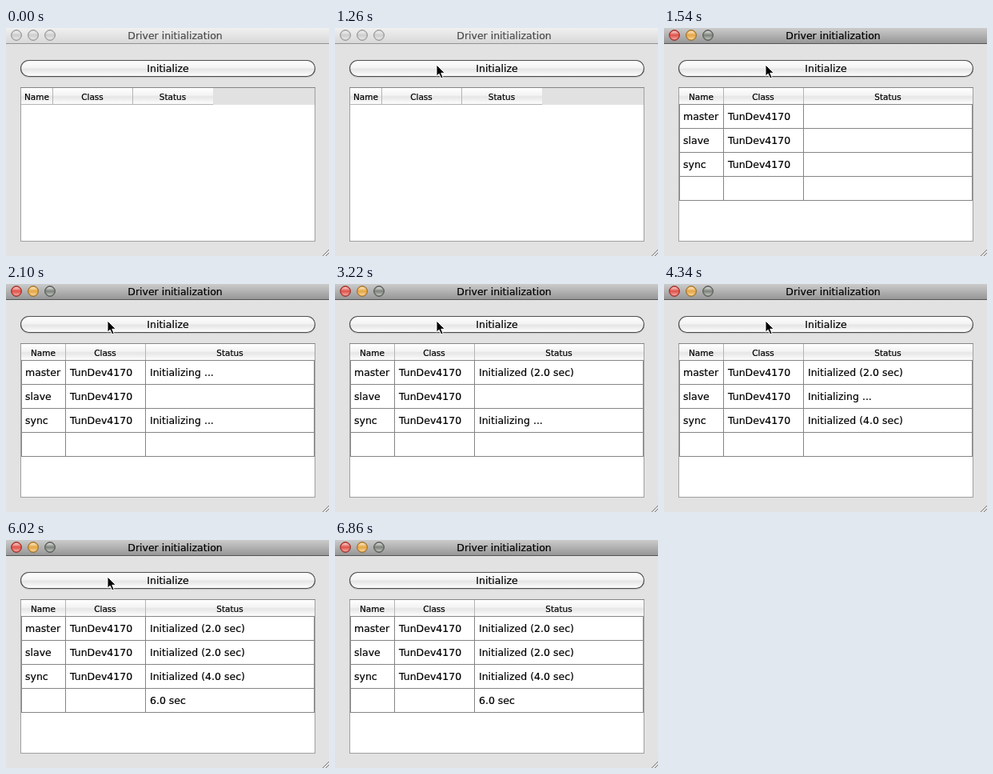
Recreate the animation shown at these times as an HTML page. Size 404 px wide and 285 px high, loop 7700 ms.

```html
<!DOCTYPE html>
<html lang="en">
<head>
<meta charset="utf-8">
<title>Driver initialization</title>
<style>
html, body { margin: 0; width: 100%; height: 100%; overflow: hidden; background: #e2e2e2; }
svg { display: block; width: 404px; height: 285px; }
text { font: 12.5px "DejaVu Sans", Verdana, sans-serif; stroke: #000; stroke-width: .2px; }
.head text { font-size: 10.5px; }
.mid { text-anchor: middle; }
.line { fill: none; stroke: #858585; shape-rendering: crispEdges; }
.sep { fill: none; stroke: #b4b4b4; shape-rendering: crispEdges; }
</style>
</head>
<body>
<svg viewBox="0 0 404 285" xmlns="http://www.w3.org/2000/svg">
  <defs>
    <linearGradient id="barOff" x2="0" y2="1"><stop stop-color="#f0f0f0"/><stop offset="1" stop-color="#d8d8d8"/></linearGradient>
    <linearGradient id="barOn" x2="0" y2="1"><stop stop-color="#cbcbcb"/><stop offset="1" stop-color="#979797"/></linearGradient>
    <linearGradient id="gloss" x2="0" y2="1">
      <stop stop-color="#fff"/><stop offset=".45" stop-color="#f3f3f3"/>
      <stop offset=".55" stop-color="#e6e6e6"/><stop offset="1" stop-color="#fdfdfd"/>
    </linearGradient>
    <linearGradient id="shine" x2="0" y2="1">
      <stop stop-color="#fff" stop-opacity=".75"/><stop offset=".5" stop-color="#fff" stop-opacity="0"/>
      <stop offset="1" stop-color="#fff" stop-opacity=".5"/>
    </linearGradient>
  </defs>
  <rect width="404" height="285" fill="#e2e2e2"/>
  <g id="bar"></g>

  <rect x="18.5" y="41.5" width="368" height="20" rx="10" fill="none" stroke="#bdbdbd"/>
  <rect x="18.5" y="40.5" width="368" height="20" rx="10" fill="url(#gloss)" stroke="#4f4f4f" stroke-width="1.2"/>
  <text class="mid" x="202.5" y="55">Initialize</text>

  <rect x="18.5" y="74.5" width="368" height="192" fill="#fff" stroke="#a0a0a0" shape-rendering="crispEdges"/>
  <path class="line" d="M18 74.5H387"/>
  <g id="before"></g>
  <g id="after"></g>

  <path d="M396 285l8-8M400 285l4-4" stroke="#777" fill="none"/>
  <path id="cursor" d="M0 0V14.2L3.2 11.3L5.7 17L8.2 15.9L5.8 10.3H10.4Z" fill="#000" stroke="#fff" stroke-width="1"/>
</svg>
<script>
const LOOP = 7700, STEP = 140;
const FOCUS = 1400, FILL = 1540, START = 2100, SECOND = 560;
const $ = id => document.getElementById(id);

const label = (x, y, s, attrs = '') => `<text x="${x}" y="${y}" ${attrs}>${s}</text>`;

// Column headers between the given edges
function header(edges) {
  const names = ['Name', 'Class', 'Status'];
  const end = edges[3];
  let out = `<rect x="19" y="75" width="${end - 19}" height="20" fill="url(#gloss)"/>` +
    `<path class="sep" d="M19 95.5H${end}"/>`;
  names.forEach((name, i) => {
    out += label((edges[i] + edges[i + 1]) / 2, 90, name, 'class="mid"');
    if (i < 2) out += `<path class="sep" d="M${edges[i + 1] + .5} 75V95"/>`;
  });
  return `<g class="head">${out}</g>`;
}

function titleBar(on) {
  const lamps = on ? ['#df5148', '#e6a640', '#7d837b'] : ['#cdcdcd', '#cdcdcd', '#cdcdcd'];
  const rim = on ? ['#8e302b', '#94682a', '#50554f'] : ['#8c8c8c', '#8c8c8c', '#8c8c8c'];
  const ink = on ? '#000' : '#4c4c4c';
  return `<rect width="404" height="19" fill="url(#${on ? 'barOn' : 'barOff'})"/>` +
    `<rect y="19" width="404" height="1" fill="${on ? '#555' : '#939393'}"/>` +
    [13, 34, 55].map((x, i) =>
      `<circle cx="${x}" cy="9" r="6.4" fill="${lamps[i]}" stroke="${rim[i]}"/>` +
      `<circle cx="${x}" cy="9" r="5.2" fill="url(#shine)"/>`).join('') +
    label(211.5, 14, 'Driver initialization', `class="mid" fill="${ink}" style="stroke:${ink}"`);
}

$('before').innerHTML = '<rect x="259" y="75" width="127" height="21" fill="#e1e1e1"/>' +
  header([19, 58, 158, 259]);

const rows = ['master', 'slave', 'sync', ''];
$('after').innerHTML = header([19, 74, 174, 386]) +
  '<path class="line" d="M19.5 96V216M74.5 96V216M174.5 96V216M385.5 96V216' +
  [95.5, 125.5, 155.5, 185.5, 215.5].map(y => `M19 ${y}H386`).join('') + '"/>' +
  rows.map((name, i) => {
    const y = 115 + i * 30;
    return label(24, y, name) + label(80, y, name && 'TunDev4170') + label(180, y, '', 'class="status"');
  }).join('');
const cells = [...document.querySelectorAll('.status')];

// Start and duration of each row's job, in seconds of the run
const jobs = [[0, 2], [4, 2], [0, 4]];

function statusText(i, sec) {
  if (i === 3) return sec >= 6 ? '6.0 sec' : '';
  const [from, len] = jobs[i];
  if (sec < from) return '';
  return sec < from + len ? 'Initializing ...' : `Initialized (${len.toFixed(1)} sec)`;
}

// Pointer path: time, x, y
const path = [[560, -12, 190], [840, 40, 130], [1120, 115, 60], [1260, 127, 46],
  [6020, 127, 46], [6300, 98, 95], [6580, 42, 190], [6860, -14, 256]];

function pointerAt(t) {
  const n = path.findIndex(p => p[0] > t);
  if (n < 1) return [-20, 0];
  const a = path[n - 1], b = path[n], k = (t - a[0]) / (b[0] - a[0]);
  return [a[1] + (b[1] - a[1]) * k, a[2] + (b[2] - a[2]) * k];
}

let shownBar = null;
function draw(t) {
  const on = t >= FOCUS, full = t >= FILL;
  if (on !== shownBar) {
    $('bar').innerHTML = titleBar(on);
    shownBar = on;
  }
  $('before').style.display = full ? 'none' : '';
  $('after').style.display = full ? '' : 'none';
  const sec = (t - START) / SECOND;
  cells.forEach((cell, i) => { cell.textContent = statusText(i, sec); });
  $('cursor').setAttribute('transform', `translate(${pointerAt(t)})`);
}

const begin = performance.now();
function tick() {
  const t = (performance.now() - begin) % LOOP;
  draw(Math.floor(t / STEP) * STEP);
  requestAnimationFrame(tick);
}
draw(0);
requestAnimationFrame(tick);
</script>
</body>
</html>
```
